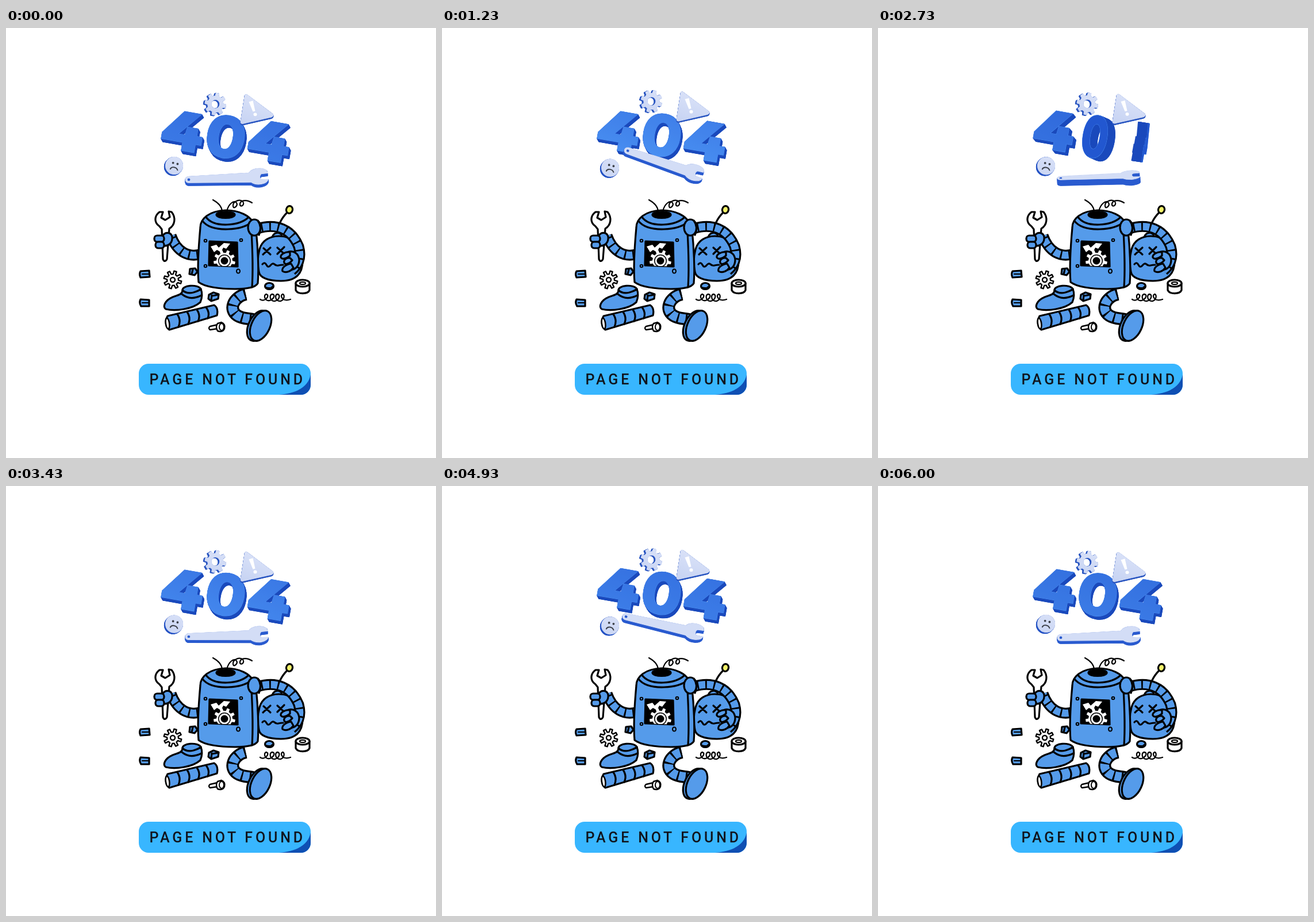
An HTML page with a canvas that plays this animation: 748 by 748 pixels, repeating every 6030 ms.

```html
<!DOCTYPE html>
<html lang="en">
<head>
<meta charset="utf-8">
<title>Page not found</title>
<style>
  html, body { margin: 0; width: 100%; height: 100%; overflow: hidden; background: #fff; }
  svg, canvas { position: absolute; left: 0; top: 0; width: 748px; height: 748px; }
  .art { fill: #559bea; stroke: #000; stroke-width: 3.2; stroke-linecap: round; stroke-linejoin: round; }
  .line { fill: none; }
  .white { fill: #fff; }
  .ink { fill: #000; }
  .tube { fill: none; stroke-linecap: butt; }
  .edge { stroke: #000; stroke-width: 19; }
  .skin { stroke: #559bea; stroke-width: 12.6; }
  .rings { stroke: #000; stroke-width: 14; stroke-dasharray: 2.8 11.5; stroke-dashoffset: -6; }
  .label { font: 500 25px Roboto, "Liberation Sans", sans-serif; letter-spacing: 4.85px; fill: #10141c; }
</style>
</head>
<body>
<svg viewBox="0 0 748 748">
  <defs>
    <path id="armL" d="M340 393 C318 400 297 390 287 361"/>
    <path id="armR" d="M438 349 C470 339 497 350 509 380 C514 398 509 412 497 422"/>
    <path id="leg" d="M417 463 C395 468 387 490 402 500 C411 506 420 505 430 507"/>
    <clipPath id="pane"><path d="M354 371 L402 373 L403 415 L353 413Z"/></clipPath>
    <clipPath id="pill"><rect x="231" y="584" width="299" height="54" rx="17"/></clipPath>
  </defs>

  <g class="art">
    <!-- spanner and left arm -->
    <path class="white" d="M267 320 C258 327 257 338 267 345 L271 350 L273 402 Q276 409 280 402 L284 349 C294 343 296 330 288 320 L283 319 L285 329 L277 334 L270 330 L273 320Z"/>
    <use href="#armL" class="tube edge"/><use href="#armL" class="tube skin"/><use href="#armL" class="tube rings"/>
    <path d="M273 361 C277 354 287 355 289 363 C290 372 285 379 275 379 C269 375 269 367 273 361Z"/>
    <rect x="258" y="361" width="17" height="11" rx="5"/>
    <rect x="260" y="372" width="15" height="11" rx="5"/>

    <!-- head -->
    <path class="line" d="M472 357 C473 343 480 330 489 321"/>
    <ellipse cx="493" cy="316" rx="5.5" ry="6.5" fill="#f4f46a" transform="rotate(15 493 316)"/>
    <path d="M463 366 C463 355 478 352 481 364Z"/>
    <path d="M441 385 C445 370 458 362 475 362 C500 362 515 380 516 405 C516 430 502 440 478 440 C456 440 441 434 440 424 C437 410 438 396 441 385Z"/>
    <path class="line" d="M448 383 L460 394 M460 382 L447 394 M472 382 L484 393 M484 381 L472 393"/>
    <path class="line" d="M446 411 Q450 406 453 412 T460 413 T467 411 T474 413 T482 412"/>

    <!-- torso -->
    <path d="M338 347 C338 332 353 318 382 317 C408 317 424 328 428 336 L435 352 C438 380 440 420 438 444 C434 452 418 454 398 454 C370 454 345 450 335 442 C333 420 335 380 338 347Z"/>
    <path class="line" d="M348 329 Q358 343 385 342 Q409 341 421 330 M342 336 Q354 351 386 350 Q414 349 427 338 M427 355 C429 390 430 420 428 451"/>
    <ellipse class="ink" cx="382" cy="325" rx="16" ry="5.5"/>
    <path class="line" stroke-width="2.2" d="M360 299 Q375 307 376 319 M384 319 C387 306 396 299 401 304 C404 309 396 316 395 310 C394 303 404 297 411 301 C417 306 409 313 407 308 C406 300 417 297 428 304"/>
    <path class="ink" d="M354 371 L402 373 L403 415 L353 413Z"/>
    <g clip-path="url(#pane)" stroke="none">
      <path class="white" d="M356 380 L366 377 L370 382 L379 374 L390 375 L383 384 L378 382 L374 390 L367 386 L362 390Z"/>
      <path id="cog" class="white" fill-rule="evenodd"/>
      <circle cx="380" cy="405" r="8" fill="none" stroke="#fff" stroke-width="3"/>
    </g>
    <g stroke-width="2"><circle cx="347" cy="370" r="2.3"/><circle cx="409" cy="369" r="2.3"/><circle cx="347" cy="414" r="2.3"/><ellipse cx="404" cy="423" rx="3" ry="3.6"/></g>

    <!-- right arm and hand -->
    <use href="#armR" class="tube edge"/><use href="#armR" class="tube skin"/><use href="#armR" class="tube rings"/>
    <ellipse cx="432" cy="347" rx="11" ry="14"/>
    <path class="line" d="M438 335 Q446 346 440 360"/>
    <path d="M492 389 C500 387 509 392 510 403 C510 416 500 424 490 419Z"/>
    <path d="M494 390 C487 388 477 394 478 399 C481 404 489 400 494 396Z"/>
    <path d="M494 400 C487 399 481 405 485 410 C489 412 495 408 498 404Z"/>
    <path d="M496 410 C487 411 479 417 481 423 C487 427 496 423 500 417Z"/>

    <!-- scattered parts -->
    <path d="M234 423 L249 422 L250 433 L234 434 Q231 428 234 423Z M234 472 L249 473 L249 484 L235 484 Q231 478 234 472Z"/>
    <path class="line" stroke-width="2.2" d="M237 428 H248 M237 478 H248"/>
    <path d="M320 419 L329 418 L333 424 L328 430 L319 428Z"/><path class="line" d="M325 420 L323 428"/>
    <path d="M353 464 L361 460 L370 463 L369 471 L357 475 L352 471Z"/><path class="line" d="M358 465 L357 473 M358 466 L369 464"/>
    <ellipse cx="458" cy="449" rx="7.5" ry="5.5"/><path class="line" stroke-width="2" d="M452 451 Q460 454 464 449"/>
    <path id="cog2" class="white" stroke-width="2.4" fill-rule="evenodd"/>
    <path class="white" d="M504 444 V456 C508 464 525 463 528 456 V444"/>
    <ellipse class="white" cx="516" cy="444" rx="12" ry="6"/><ellipse class="white" cx="516" cy="444" rx="5" ry="2.2" stroke-width="2.2"/>
    <path class="line" stroke-width="2.3" d="M442 472 C450 478 460 465 453 463 C447 464 450 476 459 474 C468 470 468 463 463 463 C457 464 459 476 468 475 C477 472 477 463 472 463 C467 464 468 476 478 475 C485 472 485 463 481 463 C476 465 480 477 495 472"/>
    <path d="M307 457 C305 447 334 445 339 454 C342 462 341 470 338 477 C325 489 295 493 278 489 C272 485 276 474 290 468 C300 464 306 464 307 457Z"/>
    <path class="line" d="M307 456 Q314 463 326 460 Q336 457 339 454 M306 463 Q320 475 340 465"/>
    <path d="M281 501 L362 482 Q370 487 367 500 L284 525 Q274 514 281 501Z"/>
    <path class="line" d="M298 498 Q305 508 300 520 M315 494 Q322 504 317 515 M332 490 Q339 500 334 510 M348 486 Q355 495 351 505"/>
    <ellipse class="white" cx="281" cy="514" rx="3.2" ry="9.5" transform="rotate(-8 281 514)" stroke-width="2.6"/>
    <path class="white" stroke-width="2.4" d="M368 516 L355 519 Q351 522 355 525 L368 523Z"/>
    <path class="white" stroke-width="2.4" d="M368 514 L375 512 Q382 515 380 523 Q377 530 368 527 Q364 520 368 514Z"/><ellipse class="white" cx="375" cy="520" rx="4" ry="6" stroke-width="2"/>
    <use href="#leg" class="tube" stroke="#000" stroke-width="22"/><use href="#leg" class="tube" stroke="#559bea" stroke-width="15.6"/>
    <use href="#leg" class="tube" stroke="#000" stroke-width="17" stroke-dasharray="2.8 12"/>
    <ellipse cx="438" cy="518" rx="16" ry="28" transform="rotate(25 438 518)"/>
    <ellipse cx="443" cy="518" rx="16" ry="28" transform="rotate(25 443 518)"/>
  </g>

  <g clip-path="url(#pill)">
    <rect x="231" y="584" width="299" height="54" fill="#38b6ff"/>
    <path d="M530 603 C526 622 510 635 475 638 H530Z" fill="#0f4fb3"/>
  </g>
  <text class="label" x="249.4" y="620">PAGE NOT FOUND</text>
</svg>
<canvas id="top" width="748" height="748"></canvas>

<script>
const PERIOD = 3015, RAD = Math.PI / 180;
const ctx = document.getElementById('top').getContext('2d');

function circle(x, y, r) {
  return `M${x - r} ${y}a${r} ${r} 0 1 0 ${2 * r} 0a${r} ${r} 0 1 0 ${-2 * r} 0Z`;
}

function cog(x, y, outer, inner, hole, teeth, start = 0) {
  const pts = [], step = 2 * Math.PI / teeth;
  for (let i = 0; i < teeth; i++) {
    for (const [u, r] of [[-.28, inner], [-.18, outer], [.18, outer], [.28, inner]]) {
      const a = start + (i + u) * step;
      pts.push((x + r * Math.cos(a)).toFixed(1) + ' ' + (y + r * Math.sin(a)).toFixed(1));
    }
  }
  return 'M' + pts.join('L') + 'Z' + circle(x, y, hole);
}

document.getElementById('cog').setAttribute('d', cog(380, 405, 19, 14, 11, 9, .2));
document.getElementById('cog2').setAttribute('d', cog(290, 438, 15.5, 10, 4, 8, .3));

const four = new Path2D('M-1-38L30-38L-5 4H7L9-11H28V3H38V18H28V33H5V18H-34V6Z');
const zero = new Path2D('M0-39C22-39 33-22 33 0S22 39 0 39S-33 22-33 0S-22-39 0-39ZM0-23C-9-23-13-12-13 0S-9 23 0 23S13 12 13 0S9-23 0-23Z');
const gear = new Path2D(cog(0, 0, 19.5, 14.5, 8, 8, .2));
const sign = new Path2D('M-11-25Q-9-28-6-25L37 9Q40 13 35 15L-15 27Q-19 27-18 22Z');
const disc = new Path2D(circle(0, 0, 15.5));
const spanner = new Path2D('M-122-6L-17-8C-12-16 5-19 14-11L15-6L4-5Q-1 0 4 6L16 6C14 14-3 19-14 10L-122 6A6 6 0 0 1-122-6Z' + circle(-122, 0, 3));

function ramp(y0, y1, from, to) {
  const g = ctx.createLinearGradient(8, y0, -8, y1);
  g.addColorStop(0, from);
  g.addColorStop(1, to);
  return g;
}
const blue = ramp(-38, 36, '#4282ea', '#4c92f3');
const pale = ramp(-25, 25, '#dae2f8', '#c8d4f3');

// Extruded shape, painted from its far side to its near side.
function solid(path, x, y, o) {
  const turn = (o.turn || 0) * RAD, pitch = (o.pitch || 0) * RAD;
  const thin = v => Math.abs(v) < .04 ? .04 : v;
  const c = thin(Math.cos(turn)), p = thin(Math.cos(pitch));
  const near = Math.sign(c * p), layers = Math.ceil(o.depth * 1.5);
  ctx.save();
  ctx.translate(x, y);
  ctx.rotate((o.tilt || 0) * RAD);
  ctx.lineJoin = 'round';
  for (let k = 0; k <= layers; k++) {
    const z = near * (k / layers - .5) * o.depth;
    const last = k === layers;
    ctx.save();
    ctx.transform(c, 0, 0, p, Math.sin(turn) * z, Math.sin(pitch) * z * c);
    ctx.fillStyle = ctx.strokeStyle = last ? o.face : o.side;
    ctx.lineWidth = 1.2;
    ctx.fill(path, 'evenodd');
    ctx.stroke(path);
    if (last && o.dim !== undefined) {
      ctx.globalAlpha = Math.min(1, o.dim + (1 - Math.abs(c)) * 2);
      ctx.fillStyle = ctx.strokeStyle = '#2257d0';
      ctx.fill(path, 'evenodd');
    }
    if (last && o.detail) o.detail();
    ctx.restore();
  }
  ctx.restore();
}

function digit(path, x, y, turn, dim) {
  solid(path, x, y, { tilt: 10, turn: turn - 13, pitch: -17, depth: 18, face: blue, side: '#1b4abc', dim });
}

function mark() {
  ctx.fillStyle = '#fff';
  ctx.fill(new Path2D('M-4-13L3-15L7 4L3 5Z'));
  ctx.fill(new Path2D(circle(7, 10, 3)));
}

function frown() {
  ctx.fillStyle = ctx.strokeStyle = '#3c4048';
  ctx.fill(new Path2D(circle(-2, -5, 2) + circle(6, -3, 2)));
  ctx.lineWidth = 2;
  ctx.lineCap = 'round';
  ctx.stroke(new Path2D('M-7 6C-5 1 4 2 6 8'));
}

const wave = (t, lag = 0) => (1 - Math.cos(2 * Math.PI * (t - lag) / PERIOD)) / 2;

// Eased full turn, given as the degrees still to go.
function spin(t, start, length) {
  const u = Math.min(1, Math.max(0, (t - start) / length));
  return u === 0 ? 0 : -360 * (1 - u * u * (3 - 2 * u));
}

function draw(now) {
  const t = now % PERIOD, lift = wave(t), dim = .45 * wave(t, 1000);
  ctx.clearRect(0, 0, 748, 748);

  solid(gear, 363, 133 - 5.5 * lift, { tilt: 8 * lift, turn: 20, pitch: -10, depth: 8, face: pale, side: '#2a56c0' });
  digit(four, 307, 185 - 3 * wave(t, 600), spin(t, 1900, 900), dim);
  digit(zero, 384, 192 - 3 * lift, spin(t, 2010, 900), dim);
  digit(four, 457.5, 201.5 - 1.2 * wave(t, 400), spin(t, 2110, 900), dim);
  solid(sign, 426.5, 142 - 5 * lift, { pitch: -18, depth: 8, face: pale, side: '#2a56c0', detail: mark });
  solid(disc, 291.5, 240.5 + 4 * lift, { turn: 14, pitch: -14, depth: 9, face: pale, side: '#2553c4', detail: frown });

  const swing = Math.pow(wave(t, -30), 2.2);
  solid(spanner, 440 - 2 * swing, 261 - 8 * swing, {
    tilt: -2.5 + 24 * swing, pitch: -25 + spin(t, 1920, 1000), depth: 12, face: '#d3ddf6', side: '#2a5bcf'
  });
}

function tick() {
  draw(performance.now());
  requestAnimationFrame(tick);
}
tick();
</script>
</body>
</html>
```
